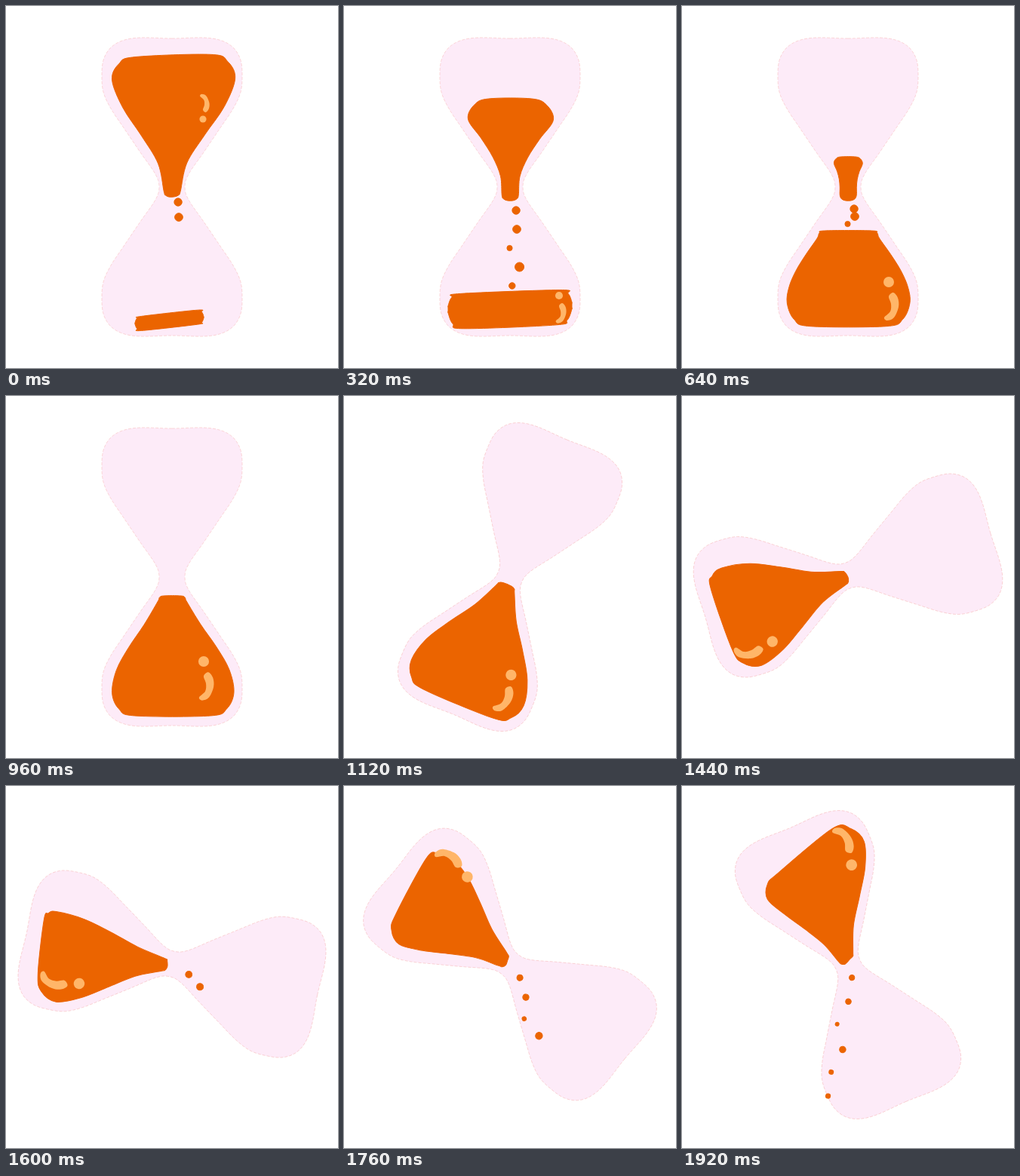
These frames come from a looping animation (440x480 px, 2.08 s). An HTML page:

```html
<!DOCTYPE html>
<html lang="en">
<head>
<meta charset="utf-8">
<title>Hourglass</title>
<style>
  html, body { margin: 0; width: 100%; height: 100%; overflow: hidden; background: #fff; }
  svg { display: block; width: 440px; height: 480px; }
  .pose { visibility: hidden; animation: show 2080ms step-end infinite; }
  .glass { fill: #fdebf8; stroke: #f8bfc0; stroke-width: .6; stroke-dasharray: 4 2; }
  .liquid { fill: #eb6400; stroke: #eb6400; }
  .shine { fill: #ffb669; }
  @keyframes show {
    0% { visibility: visible; }
    7.6923077%, 100% { visibility: hidden; }
  }
</style>
</head>
<body>
<svg id="stage" viewBox="0 0 440 480"></svg>
<script>
const STEP = 160;
const STEPS = 13;
const BULB = 82;
const stage = document.getElementById('stage');

// Piecewise linear value over [step, value] keys.
const track = (...keys) => step => {
  const next = keys.findIndex(([at]) => at >= step);
  if (next < 0) return keys[keys.length - 1][1];
  if (next === 0) return keys[0][1];
  const [[a, from], [b, to]] = [keys[next - 1], keys[next]];
  return from + (to - from) * (step - a) / (b - a);
};

// A bulb fills (steps 0-6), is turned over (6-13) and drains (13-19).
const DRAINED = 19;
const angle = track([6, 0], [8, 45], [10, 102], [12, 157], [13, 180]);
const rise = track([8, 0], [10, 4], [12, 3], [13, 0]);

// Liquid in bulb coordinates: distances from the neck, widths from the axis.
const near = track([0, 167], [2, 139], [4, 58], [6, 25], [8, -4], [10, 6], [12, 4], [13, -13], [15, -18]);
const far = track([0, 186], [6, 184], [8, 179], [10, 176], [12, 160], [13, 174], [15, 117], [17, 40], [19, 2]);
const leftWidth = track([0, 49], [2, BULB], [8, 78], [10, 36], [12, 84]);
const rightWidth = track([0, 42], [2, BULB], [10, BULB], [12, 70], [13, 80]);
const tilt = track([0, -.09], [2, -.03], [4, 0], [8, 0], [10, -.06], [12, -.17], [13, -.02], [15, 0]);

const shineX = track([2, 65], [4, 54], [6, 42], [8, 60], [10, 51], [12, 56], [13, 41]);
const shineY = track([2, 144], [4, 126], [6, 112], [8, 127], [10, 115], [12, 120], [13, 90]);
const shineSize = track([0, 0], [2, .72], [4, 1], [12, 1.05], [13, .65], [15, 0]);

const dropCount = track([0, 2], [2, 5], [4, 3], [5, 1], [6, 0], [9, 0], [10, 2], [12, 6]);
const dropStart = track([0, 20], [2, 31], [4, 29], [10, 25], [12, 16]);
const dropGap = track([0, 20], [2, 25], [4, 10], [10, 22], [12, 32]);
const dropLean = track([10, -40], [12, 10]);
const dropScale = track([8, 1], [12, .7]);

// Closed Catmull-Rom curve through the points, as cubic Béziers.
function smooth(points) {
  const n = points.length;
  const at = i => points[(i + n) % n];
  const handle = (p, a, b, sign) => p.map((v, k) => v + sign * (b[k] - a[k]) / 6);
  let d = 'M' + points[0];
  for (let i = 0; i < n; i++) {
    const p = at(i), q = at(i + 1);
    d += `C${handle(p, at(i - 1), q, 1)} ${handle(q, p, at(i + 2), -1)} ${q}`;
  }
  return d + 'Z';
}

const mirror = points => points.map(([x, y]) => [-x, y]).reverse();

function add(parent, tag, attrs) {
  const el = document.createElementNS('http://www.w3.org/2000/svg', tag);
  for (const key in attrs) el.setAttribute(key, attrs[key]);
  return parent.appendChild(el);
}

const quarter = [[0, -197], [42, -198], [66, -194], [82, -184], [91, -168], [93, -148],
  [91, -126], [81, -104], [63, -77], [42, -46], [22, -17], [17, 0]];
const lower = quarter.slice(0, -1).reverse().map(([x, y]) => [x, -y]);
const rightHalf = [...quarter, ...lower];
const glassPath = smooth([...rightHalf, ...mirror(rightHalf.slice(1, -1))]);

const crescent = smooth([[0, 19], [6, 14], [12, 21], [13, 33], [7, 47], [-2, 51], [-6, 47], [2, 39], [3, 29]]);

// Share of the full width that the bulb allows at distance y from the neck.
function wall(y) {
  const u = Math.min(1, Math.max(0, y / 150));
  return (11 + 71 * u * u * (3 - 2 * u)) / BULB;
}

// One side of the liquid, from the neck end to the far end, with round corners.
function flank(step, full, slope) {
  const width = y => full * wall(y);
  const start = near(step) + slope * width(near(step));
  const end = far(step) + slope * width(far(step));
  const limit = (end - start) * .45;
  const r1 = Math.min(6 + width(start) / 8, width(start), limit);
  const r2 = Math.min(width(end) * .38, limit);
  const a = start + r1, b = end - r2;
  const points = [[width(a) - r1, start], [width(a) - .3 * r1, start + .3 * r1]];
  for (let i = 0; i <= 4; i++) {
    const y = a + (b - a) * i / 4;
    points.push([width(y), y]);
  }
  points.push([width(b) - .3 * r2, end - .3 * r2], [width(b) - r2, end]);
  return points;
}

const placed = step => `translate(220 ${240 - rise(step)}) rotate(${angle(step)})`;

function drawLiquid(pose, step) {
  const bulb = add(pose, 'g', { transform: placed(step) });
  const right = flank(step, rightWidth(step), tilt(step));
  const left = flank(step, leftWidth(step), -tilt(step));
  add(bulb, 'path', { class: 'liquid', d: smooth([...right, ...mirror(left)]) });

  const side = step > 10 ? -1 : 1;
  const size = shineSize(step);
  const shine = add(bulb, 'g', {
    class: 'shine',
    transform: `translate(${side * shineX(step)} ${shineY(step)}) scale(${side * size} ${size})`
  });
  add(shine, 'circle', { r: 7 });
  add(shine, 'path', { d: crescent });
}

function drawDrops(pose, step) {
  const trail = add(pose, 'g', { transform: `translate(220 ${240 - rise(step)}) rotate(${dropLean(step) * (step > 6)})` });
  for (let k = 0; k < Math.round(dropCount(step)); k++) {
    const sway = Math.sin(k * 2.4 + .3);
    add(trail, 'circle', {
      class: 'liquid',
      cx: 6 + 7 * sway,
      cy: dropStart(step) + k * dropGap(step),
      r: (4.8 + 1.3 * sway) * dropScale(step)
    });
  }
}

for (let step = 0; step < STEPS; step++) {
  const pose = add(stage, 'g', { class: 'pose', style: `animation-delay:${step * STEP}ms` });
  add(pose, 'path', { class: 'glass', d: glassPath, transform: placed(step) });
  drawLiquid(pose, step);
  if (step + STEPS < DRAINED) drawLiquid(pose, step + STEPS);
  drawDrops(pose, step);
}
</script>
</body>
</html>
```
